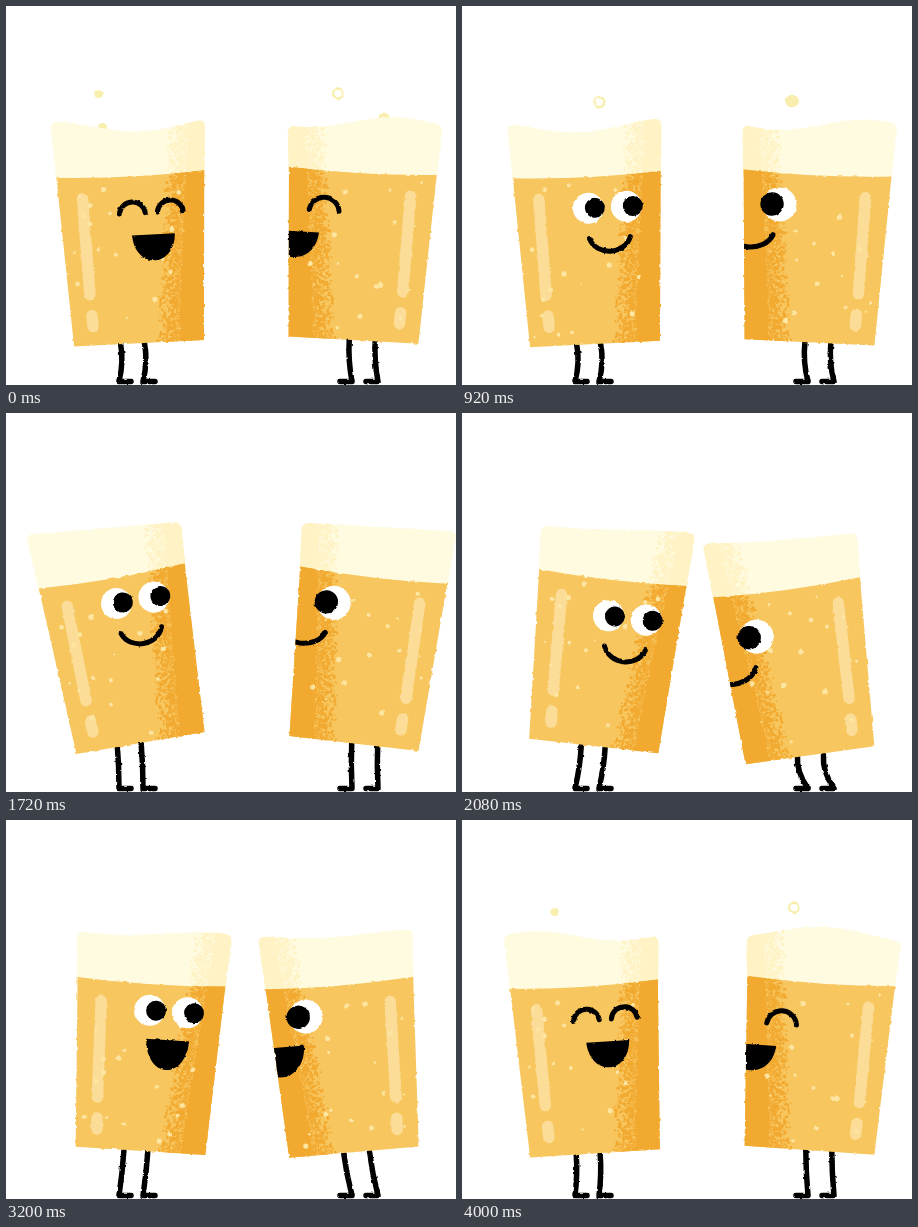
An HTML page with a canvas that plays this animation: 450 px wide and 379 px high, repeating every 4040 ms.

```html
<!DOCTYPE html>
<html lang="en">
<head>
<meta charset="utf-8">
<title>Cheers</title>
<style>
html, body { margin: 0; width: 100%; height: 100%; overflow: hidden; background: #fff; }
canvas { display: block; filter: url(#rough); }
svg { position: absolute; }
</style>
</head>
<body>
<svg width="0" height="0">
  <filter id="rough" x="0" y="0" width="100%" height="100%" color-interpolation-filters="sRGB">
    <feTurbulence type="fractalNoise" baseFrequency=".22" numOctaves="2" seed="4" result="noise"/>
    <feDisplacementMap in="SourceGraphic" in2="noise" scale="2.6" xChannelSelector="R" yChannelSelector="G"/>
  </filter>
</svg>
<canvas id="stage" width="450" height="379"></canvas>
<script>
const ctx = document.getElementById('stage').getContext('2d');
const LOOP = 4040, BEATS = 18, CLINK = 2120, LINE = -169.5, RIM = -218;
const SPLASH = '#f8eeae';

// Each triple holds the value when leaning back, at rest and at the clink.
const glasses = [
  {
    side: 1, x: [134.5, 133, 131.5], y: [330, 334, 332.5],
    tilt: [-9.8, -3.6, 8.3], face: [-5, -2.5, 6.5], faceSwing: 3,
    beat: .96, wave: 5.06, mouthX: 20, mouth: 21.5,
    eyes: [0, 38], pupil: 10, white: 15.5, look: 6.5, arc: 13,
    hip: 116, hipTilt: .5, ankle: 113, gap: 24, seed: 313
  },
  {
    side: -1, x: [348, 347.5, 348], y: [330.5, 333.5, 343],
    tilt: [-6.7, -3.3, 9.9], face: [-1, 3, 14], faceSwing: -4,
    beat: .17, wave: 3.32, mouthX: 65, mouth: 24.5,
    eyes: [36.5], pupil: 11.7, white: 17, look: 7.5, arc: 15,
    hip: 341, hipTilt: -.7, ankle: 346, gap: 26, seed: 907
  }
];

// Time, lean towards the partner, sag of the body.
const keys = [
  [0, 0, 0], [1200, 0, 0], [1700, -1, -1], [1900, -.85, -.7],
  [CLINK, 1, 1], [2640, 1, 1], [3200, .6, -1], [3560, 0, 0], [LOOP, 0, 0]
];

function random(seed) {
  return () => (seed = (seed * 16807) % 2147483647) / 2147483647;
}

function acting(t) {
  const i = keys.findIndex(key => key[0] > t);
  const [t0, ...from] = keys[i - 1], [t1, ...to] = keys[i];
  const p = (t - t0) / (t1 - t0), k = p * p * (3 - 2 * p);
  return from.map((v, j) => v + (to[j] - v) * k);
}

function blend(v, [low, mid, high]) {
  return mid + (v < 0 ? (mid - low) * v : (high - mid) * v);
}

function dot(x, y, rx, color, ry = rx) {
  ctx.fillStyle = color;
  ctx.beginPath();
  ctx.ellipse(x, y, rx, ry, 0, 0, 7);
  ctx.fill();
}

function stroke(width, color, draw) {
  ctx.lineWidth = width;
  ctx.strokeStyle = color;
  ctx.beginPath();
  draw();
  ctx.stroke();
}

// Shaded side of a glass with a grainy border.
const shade = new Path2D('M35 4H90V-245H58Z');
const grain = random(71);
for (let i = 0; i < 1500; i++) {
  const y = -240 * grain(), size = 1 + 1.6 * grain();
  shade.rect(17 - y * .095 + 21 * Math.sqrt(grain()), y, size, size);
}

const beer = new Path2D(`M-74 ${LINE}Q0 ${LINE + 5} 74 ${LINE}L65 0H-65Z`);

// The surface tips against the tilt and carries a travelling wave.
function foamPath(tilt, amp, phase) {
  const height = x => RIM - tilt * .009 * x + amp * Math.sin(phase + (x + 70) * .035);
  const path = new Path2D();
  path.moveTo(-74, LINE + 6);
  path.lineTo(-77, height(-77) + 7);
  path.quadraticCurveTo(-77, height(-77), -70, height(-70));
  for (let x = -65; x <= 70; x += 5) path.lineTo(x, height(x));
  path.quadraticCurveTo(77, height(77), 77, height(77) + 7);
  path.lineTo(74, LINE + 6);
  path.closePath();
  return path;
}

function fillShaded(path, light, dark) {
  ctx.save();
  ctx.fillStyle = light;
  ctx.fill(path);
  ctx.clip(path);
  ctx.fillStyle = dark;
  ctx.fill(shade);
  ctx.restore();
}

function drawLegs(g, y, tilt) {
  for (const shift of [0, g.gap]) {
    const hip = g.hip + tilt * g.hipTilt + shift, ankle = g.ankle + shift;
    const knee = (hip + ankle) / 2 + g.side * (1 + Math.max(0, y - 331) * .5);
    stroke(5.5, '#000', () => {
      ctx.moveTo(hip, y);
      ctx.quadraticCurveTo(knee, (y + 375) / 2, ankle, 375.5);
      ctx.lineTo(ankle + g.side * 12, 375.5);
    });
  }
}

function drawFizz(g, t) {
  const rnd = random(g.seed);
  for (let i = 0; i < 17; i++) {
    const x = -60 + 116 * rnd(), r = 1 + 1.7 * rnd();
    const turns = 1 + Math.floor(rnd() * 2);
    const p = (rnd() + turns * t / LOOP) % 1;
    dot(x, -8 - 154 * p, r, '#fde5a2');
  }
}

function drawFace(g, t, offset) {
  const laughing = t < 640 || t >= 3440;
  for (const x of g.eyes) {
    if (laughing) {
      stroke(5, '#000', () => ctx.arc(x, offset - 128.5, g.arc, Math.PI * 1.04, Math.PI * 1.96));
    } else {
      dot(x, offset - 136.5, g.white, '#fff');
      dot(x + g.look, offset - 136.5, g.pupil, '#000');
    }
  }
  const x = g.mouthX, w = g.mouth, y = offset - 108;
  if (laughing || t >= 2900) {
    const depth = (laughing ? 26 : 30) * 4 / 3;
    ctx.fillStyle = '#000';
    ctx.beginPath();
    ctx.moveTo(x - w, y);
    ctx.lineTo(x + w, y);
    ctx.bezierCurveTo(x + w - 2, y + depth, x - w + 2, y + depth, x - w, y);
    ctx.fill();
  } else {
    stroke(5, '#000', () => {
      ctx.moveTo(x - w + 1, y + 2);
      ctx.bezierCurveTo(x - w * .65, y + 20, x + w * .65, y + 20, x + w - 1, y + 2);
    });
  }
}

function drawGlass(g, t) {
  const [lean, sag] = acting(t);
  const calm = 1 - Math.abs(lean), phase = t / LOOP * BEATS * 2 * Math.PI;
  const bob = calm * Math.sin(phase + g.beat);
  const y = blend(sag, g.y) + 4 * bob;
  const tilt = blend(lean, g.tilt) + .8 * bob;

  drawLegs(g, y, tilt);
  ctx.save();
  ctx.translate(blend(sag, g.x), y);
  ctx.scale(g.side, 1);
  ctx.rotate(tilt * Math.PI / 180);
  fillShaded(foamPath(tilt, 6 * calm, phase + g.wave), '#fffbe1', '#fff2c4');
  fillShaded(beer, '#f7c65e', '#f2a930');
  ctx.clip(beer);
  stroke(11.5, '#fbdd98', () => {
    ctx.moveTo(-49, -147);
    ctx.lineTo(-46.5, -51);
    ctx.moveTo(-45.5, -30);
    ctx.lineTo(-45, -19);
  });
  drawFizz(g, t);
  drawFace(g, t, blend(sag, g.face) + g.faceSwing * bob);
  ctx.restore();
}

// Bubbles leave the foam while the glasses laugh, then pop into rings.
function drawBubbles(t) {
  const rnd = random(58);
  for (let i = 0; i < 14; i++) {
    const x = (i % 2 ? 358 : 120) + 90 * (rnd() - .5);
    const y = 84 + 14 * rnd(), r = 4 + 3 * rnd();
    const age = (t - 3400 - i * 105 + LOOP) % LOOP - 260;
    if (age < 0) dot(x, y - age * .1, r, SPLASH, r * .9);
    else if (age < 80) stroke(2.5, SPLASH, () => ctx.arc(x, y, 5, 0, 7));
  }
}

// Drops thrown up when the rims touch.
function drawSplash(age) {
  if (age < 0 || age > 320) return;
  const rnd = random(45);
  for (let i = -4; i <= 4; i++) {
    const vx = i * .07 + (rnd() - .5) * .05, vy = 1.2 - Math.abs(i) * .1;
    const y = 122 - vy * age + .0045 * age * age, r = 3 + 3 * rnd();
    if (y < 128) dot(236 + vx * age, y, r, SPLASH);
  }
}

function frame(now) {
  const t = Math.floor(now % LOOP / 40) * 40;
  ctx.clearRect(0, 0, 450, 379);
  ctx.lineCap = ctx.lineJoin = 'round';
  drawBubbles(t);
  drawSplash(t - CLINK);
  for (const g of glasses) drawGlass(g, t);
  requestAnimationFrame(frame);
}
requestAnimationFrame(frame);
</script>
</body>
</html>
```
